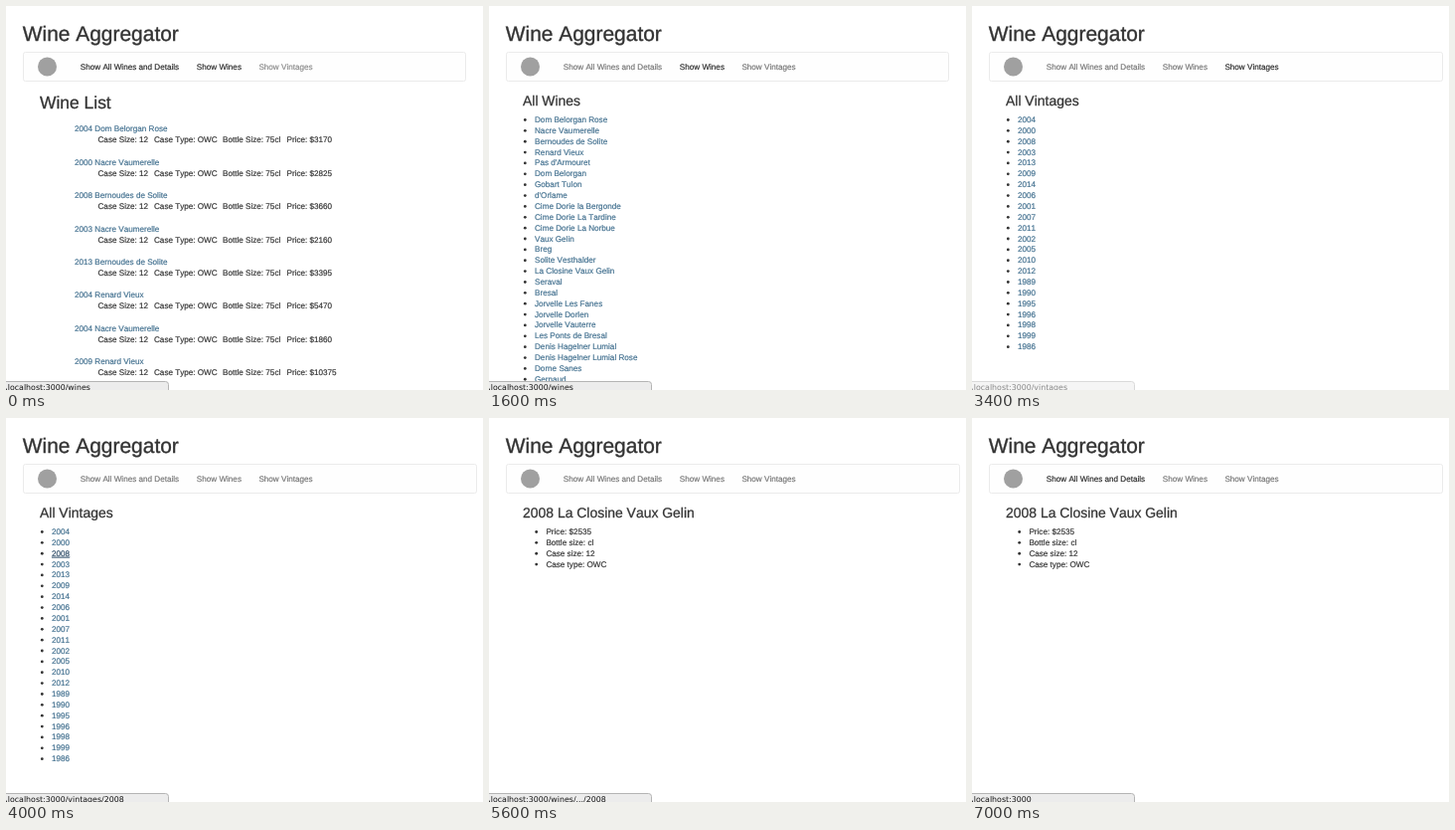
An HTML page that plays this animation: 480x386 px, repeating every 7100 ms.

```html
<!DOCTYPE html>
<html lang="en">
<head>
<meta charset="utf-8">
<title>Wine Aggregator</title>
<style>
  html, body { margin: 0; width: 100%; height: 100%; overflow: hidden; background: #fff; }
  svg { display: block; width: 480px; height: 386px; }
  /* A thin outline gives the slightly heavy look of scaled-down type */
  text {
    font: 8.14px "Liberation Sans", Arial, sans-serif;
    font-kerning: none;
    color: #333;
    fill: currentColor;
    stroke: currentColor;
    stroke-width: 0.18px;
    text-rendering: geometricPrecision;
    white-space: pre;
  }
  .h1 { font-size: 20.93px; stroke-width: 0.35px; }
  .h2 { font-size: 17.45px; stroke-width: 0.3px; }
  .h3 { font-size: 13.95px; stroke-width: 0.25px; }
  .link { color: #42708f; }
  .link.hover { color: #2b4a66; text-decoration: underline; }
  .nav { color: #777; }
  .nav.on { color: #2c2c2c; }
  .nav.pale { color: #8c8c8c; }
  .url { font: 7.87px "DejaVu Sans", sans-serif; color: #111; stroke: none; }
</style>
</head>
<body>
<svg id="stage" viewBox="0 0 480 386"></svg>
<script>
const LOOP = 7100;
const ROW = 10.865;
const HOST = 'localhost:3000';
const stage = document.getElementById('stage');

function add(parent, tag, attrs, text) {
  const el = document.createElementNS('http://www.w3.org/2000/svg', tag);
  for (const key in attrs) el.setAttribute(key, attrs[key]);
  if (text !== undefined) el.textContent = text;
  parent.appendChild(el);
  return el;
}

const label = (parent, x, y, text, cls = '') => add(parent, 'text', { x, y, class: cls }, text);

// Page content
const offers = [
  ['2004 Dom Belorgan Rose', 3170],
  ['2000 Nacre Vaumerelle', 2825],
  ['2008 Bernoudes de Solite', 3660],
  ['2003 Nacre Vaumerelle', 2160],
  ['2013 Bernoudes de Solite', 3395],
  ['2004 Renard Vieux', 5470],
  ['2004 Nacre Vaumerelle', 1860],
  ['2009 Renard Vieux', 10375]
];

const wines = [
  'Dom Belorgan Rose', 'Nacre Vaumerelle', 'Bernoudes de Solite', 'Renard Vieux',
  "Pas d'Armouret", 'Dom Belorgan', 'Gobart Tulon', "d'Orlame",
  'Cime Dorie la Bergonde', 'Cime Dorie La Tardine', 'Cime Dorie La Norbue',
  'Vaux Gelin', 'Breg', 'Solite Vesthalder', 'La Closine Vaux Gelin', 'Seraval',
  'Bresal', 'Jorvelle Les Fanes', 'Jorvelle Dorlen', 'Jorvelle Vauterre',
  'Les Ponts de Bresal', 'Denis Hagelner Lumial', 'Denis Hagelner Lumial Rose',
  'Dorne Sanes', 'Gernaud'
];

const years = ('2004 2000 2008 2003 2013 2009 2014 2006 2001 2007 2011 ' +
  '2002 2005 2010 2012 1989 1990 1995 1996 1998 1999 1986').split(' ');

const vintage = [
  'Bernoudes de Solite', 'Nacre Vaumerelle', 'Gobart Tulon', 'Vaux Gelin',
  'Solite Vesthalder', 'La Closine Vaux Gelin', 'Seraval', 'Bresal',
  'Jorvelle Les Fanes', 'Jorvelle Vauterre', 'Les Ponts de Bresal', 'Dorne Sanes',
  'Gernaud', 'Beaudris', 'Agneau Vesthalder', 'Sorvilena', 'Vonie', 'Orchen',
  'Calvus', 'Brison Comte', 'Brison Sabonel', 'Sornet Donet', 'Solvo'
].map(name => '2008 ' + name);

const facts = ['Price: $2535', 'Bottle size: cl', 'Case size: 12', 'Case type: OWC'];

// Page builders
function offerPage() {
  const g = add(stage, 'g');
  label(g, 34, 103, 'Wine List', 'h2');
  offers.forEach(([name, price], i) => {
    const y = 126.4 + i * 33.4;
    label(g, 69, y, name, 'link');
    label(g, 92.5, y + 11, 'Case Size: 12');
    label(g, 149, y + 11, 'Case Type: OWC');
    label(g, 218, y + 11, 'Bottle Size: 75cl');
    label(g, 282.5, y + 11, 'Price: $' + price);
  });
  return { g, rows: [] };
}

function listPage(title, items, x = 46, cls = 'link') {
  const g = add(stage, 'g');
  label(g, 34, 100, title, 'h3');
  const rows = items.map((item, i) => {
    const y = 117 + i * ROW;
    add(g, 'circle', { cx: x - 9.7, cy: y - 2.5, r: 1.4, fill: '#333' });
    return label(g, x, y, item, cls);
  });
  return { g, rows };
}

// Fixed header
label(stage, 16.8, 35.4, 'Wine Aggregator', 'h1');
const bar = add(stage, 'rect', {
  x: 17.5, y: 46.5, height: 29, rx: 2, fill: '#fefefe', stroke: '#ebebeb'
});
add(stage, 'circle', { cx: 41.5, cy: 61, r: 9.5, fill: '#a0a0a0' });
const nav = [[74.8, 'Show All Wines and Details'], [191.8, 'Show Wines'], [254.4, 'Show Vintages']]
  .map(([x, text]) => label(stage, x, 64, text, 'nav'));

const pages = {
  offers: offerPage(),
  wines: listPage('All Wines', wines),
  years: listPage('All Vintages', years),
  vintage: listPage('All wines from the 2008 vintage', vintage),
  detail: listPage('2008 La Closine Vaux Gelin', facts, 57.4, '')
};

// Browser status bubble
const status = add(stage, 'g');
add(status, 'path', {
  d: 'M-2 377.5H160.5Q163.5 377.5 163.5 380.5V390H-2Z', fill: '#ececec', stroke: '#b4b4b4'
});
add(status, 'rect', { x: 0, y: 384.6, width: 1, height: 1.4, fill: '#333' });
const url = label(status, 1.8, 385.6, '', 'url');

// Each step changes only the fields it names
const steps = [
  [0, { page: 'offers', on: [0, 1], pale: 2, hover: -1, path: '/wines' }],
  [100, { pale: -1 }],
  [800, { on: [1] }],
  [1500, { page: 'wines' }],
  [2300, { on: [2], path: '/vintages' }],
  [2900, { page: 'years' }],
  [3900, { on: [], hover: 2, path: '/vintages/2008' }],
  [4200, { page: 'vintage', hover: -1 }],
  [4500, { hover: 2, path: '/wines/.../2008' }],
  [4800, { hover: 3, path: '/wines/Vaux-Gelin/2008' }],
  [5000, { hover: 5, path: '/wines/.../2008' }],
  [5400, { page: 'detail', hover: -1 }],
  [6800, { on: [0], path: '' }]
];
let state = {};
const states = steps.map(([at, patch]) => (state = { ...state, ...patch, at }));

function bubbleOpacity(t) {
  if (t < 3300 || t >= 3900) return 1;
  return Math.max(0, 1 - (Math.floor((t - 3300) / 100) + 1) / 4);
}

let shown = null;
function show(s) {
  shown = s;
  for (const name in pages) {
    pages[name].g.style.display = name === s.page ? '' : 'none';
  }
  pages[s.page].rows.forEach((row, i) => row.classList.toggle('hover', i === s.hover));
  nav.forEach((item, i) => {
    item.classList.toggle('on', s.on.includes(i));
    item.classList.toggle('pale', i === s.pale);
  });
  // Long pages lose some width to the scrollbar
  bar.setAttribute('width', s.page === 'offers' || s.page === 'wines' ? 445 : 456);
  url.textContent = HOST + s.path;
}

function draw(t) {
  const s = states.filter(item => item.at <= t).pop();
  if (s !== shown) show(s);
  status.setAttribute('opacity', bubbleOpacity(t));
}

const start = performance.now();
function tick() {
  draw((performance.now() - start) % LOOP);
  requestAnimationFrame(tick);
}
tick();
</script>
</body>
</html>
```
